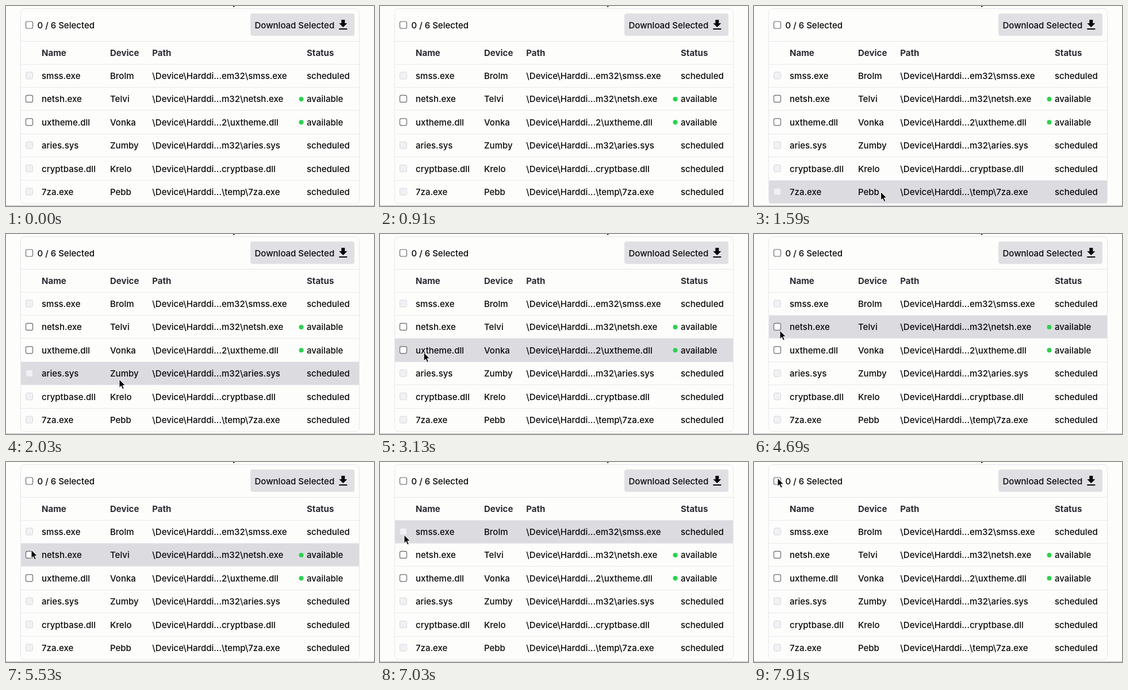
An HTML page that plays this animation: 640 by 348 pixels, repeating every 8 s.

```html
<!DOCTYPE html>
<html lang="en">
<head>
<meta charset="utf-8">
<title>File list</title>
<style>
  html, body { margin: 0; width: 100%; height: 100%; overflow: hidden; background: #fdfdfb; }
  svg { display: block; width: 640px; height: 348px; }
  text { font: 450 15px Inter, Roboto, sans-serif; fill: #08080a; white-space: pre; }
  .head { font-weight: 650; fill: #2b2c34; }
  .line { stroke: #e8e8f0; fill: none; }
  .box { fill: #fff; stroke: #6a6a6e; stroke-width: 1.2; }
  .box.off { fill: #f1f1f3; stroke: #d8d8e0; stroke-width: 1; }
</style>
</head>
<body>
<svg id="stage" viewBox="0 0 640 348"></svg>
<script>
const LOOP = 8000, TOP = 101, PITCH = 40.4;
const COLUMNS = [62, 181, 254.3, 523];
const ROWS = [
  ['smss.exe', 'Brolm', 'em32\\smss.exe', false],
  ['netsh.exe', 'Telvi', 'm32\\netsh.exe', true],
  ['uxtheme.dll', 'Vonka', '2\\uxtheme.dll', true],
  ['aries.sys', 'Zumby', 'm32\\aries.sys', false],
  ['cryptbase.dll', 'Krelo', 'cryptbase.dll', false],
  ['7za.exe', 'Pebb', '\\temp\\7za.exe', false]
];
// Pointer path: time, x, y
const PATH = [
  [1350, 230, 352], [2030, 197, 253], [3300, 70, 204], [4090, 55, 189],
  [4900, 43, 164], [5530, 44, 153], [5850, 43, 130], [7030, 42, 127],
  [7450, 41, 31], [7910, 41, 28]
];

const stage = document.getElementById('stage');

function add(tag, attrs, content) {
  const el = document.createElementNS('http://www.w3.org/2000/svg', tag);
  for (const key in attrs) el.setAttribute(key, attrs[key]);
  if (content) el.textContent = content;
  return stage.appendChild(el);
}

const label = (x, y, content, cls = '') => add('text', { x, y, class: cls }, content);
const rule = y => add('path', { d: `M25.5 ${y}H614`, class: 'line' });
const checkbox = (y, on) => add('rect', {
  x: 34.5, y: y - 6, width: 12, height: 12, rx: 2.5, class: on ? 'box' : 'box off'
});

// Surroundings: descender of the cut-off heading and the bottom edge
add('rect', { x: 395, y: 0, width: 2.4, height: 1.6, fill: '#121214' });
add('path', { d: 'M0 347.5H640', stroke: '#bcbcbe' });

const hover = add('rect', { x: 26, width: 588, height: PITCH, fill: '#dcdce0' });
add('rect', { x: 25.5, y: 4.5, width: 589, height: 339.5, rx: 7, class: 'line' });

// Toolbar
checkbox(33, true);
label(54.5, 38.5, '0 / 6 Selected');
add('rect', { x: 425, y: 13, width: 181, height: 39, rx: 4, fill: '#e0e0e4' });
label(432.5, 38.5, 'Download Selected');
add('path', {
  d: 'M19 9h-4V3H9v6H5l7 7 7-7zM5 18v2h14v-2z',
  transform: 'translate(574.3 21)', fill: '#08080a'
});
rule(61.5);

// Table
['Name', 'Device', 'Path', 'Status'].forEach((title, i) => label(COLUMNS[i], 87, title, 'head'));
ROWS.forEach(([name, device, tail, ready], i) => {
  const y = TOP + i * PITCH, base = y + 26;
  rule(Math.floor(y) + 0.5);
  checkbox(y + 20, ready);
  const status = ready ? 'available' : 'scheduled';
  [name, device, '\\Device\\Harddi...' + tail, status]
    .forEach((value, col) => label(COLUMNS[col], base, value));
  if (ready) add('circle', { cx: 513.5, cy: y + 20.5, r: 4, fill: '#2fcf50' });
});

const pointer = add('path', {
  d: 'M0 0V14.5L3.3 11.4 5.7 17 8.3 15.9 5.9 10.4H10.5Z',
  fill: '#050505', stroke: '#fff', 'stroke-width': 1, 'stroke-linejoin': 'round'
});

function locate(t) {
  const next = PATH.findIndex(p => p[0] > t);
  if (next === 0) return null;
  if (next < 0) return PATH[PATH.length - 1].slice(1);
  const a = PATH[next - 1], b = PATH[next];
  const u = (t - a[0]) / (b[0] - a[0]), k = u * u * (3 - 2 * u);
  return [a[1] + (b[1] - a[1]) * k, a[2] + (b[2] - a[2]) * k];
}

function render(t) {
  const pos = locate(t);
  const row = pos ? Math.floor((pos[1] - TOP) / PITCH) : -1;
  const active = row >= 0 && row < ROWS.length;
  hover.setAttribute('visibility', active ? 'visible' : 'hidden');
  if (active) hover.setAttribute('y', TOP + row * PITCH);
  pointer.setAttribute('visibility', pos ? 'visible' : 'hidden');
  if (pos) pointer.setAttribute('transform', `translate(${pos[0]} ${pos[1]})`);
}

const start = performance.now();
function tick() {
  render((performance.now() - start) % LOOP);
  requestAnimationFrame(tick);
}
render(0);
requestAnimationFrame(tick);
</script>
</body>
</html>
```
